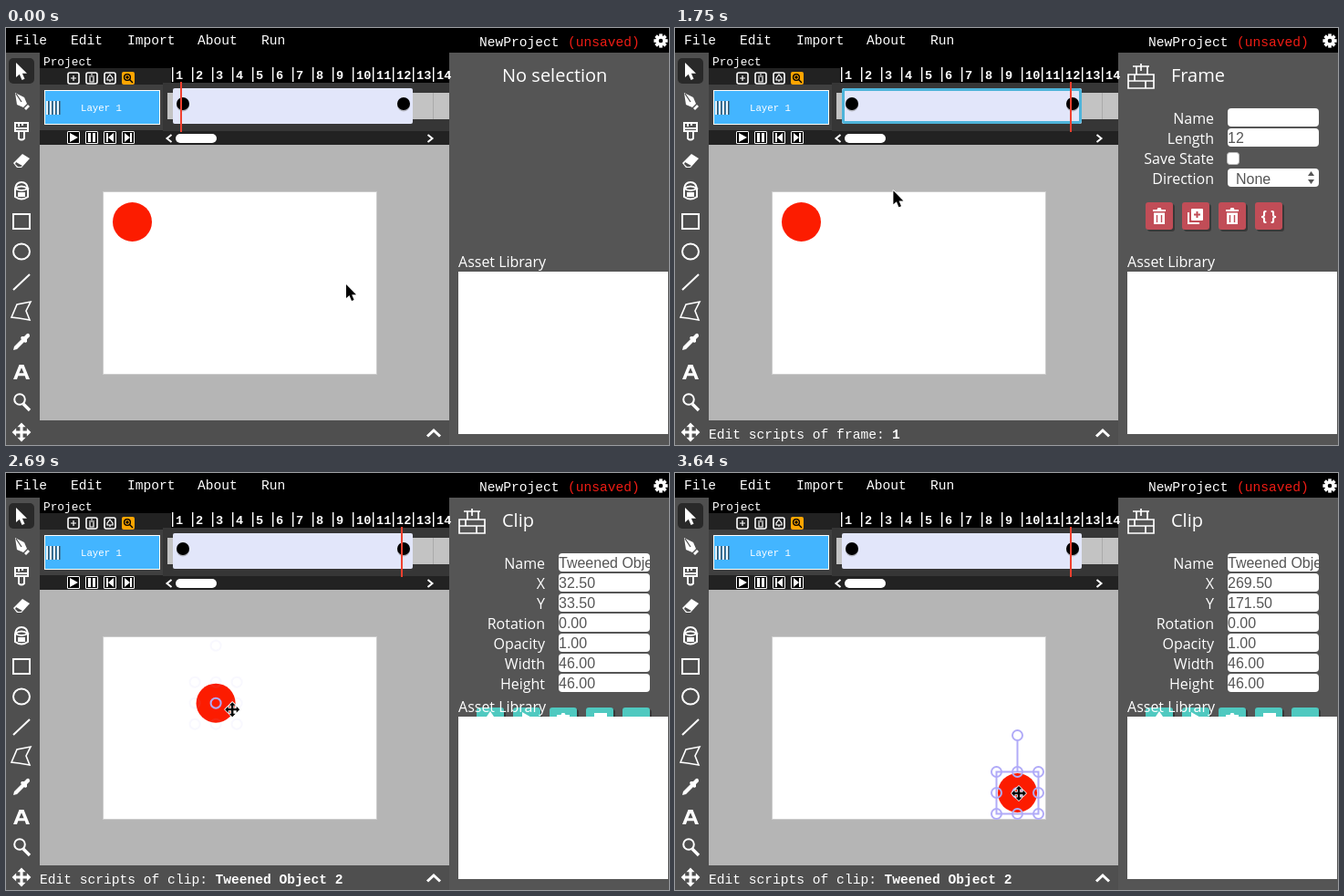
An HTML page that plays this animation: 727 px wide and 457 px high, repeating every 3.88 s.

```html
<!DOCTYPE html>
<html lang="en">
<head>
<meta charset="utf-8">
<title>Tween editor</title>
<style>
html, body { margin: 0; width: 100%; height: 100%; overflow: hidden; background: #555; }
svg { display: block; width: 727px; height: 457px; }
text { white-space: pre; }
.mono { font: 14.6px "Liberation Mono", monospace; fill: #fff; }
.sans { font: 16px "Open Sans", sans-serif; fill: #fff; }
.title { font-size: 20px; }
.value { font: 16px "Liberation Sans", sans-serif; fill: #555; }
.line { fill: none; stroke: #fff; stroke-width: 2; }
</style>
</head>
<body>
<svg id="stage" viewBox="0 0 727 457"></svg>
<script>
const LOOP = 3880;
const svg = document.getElementById('stage');

const rect = (x, y, w, h, fill, extra = '') =>
  `<rect x="${x}" y="${y}" width="${w}" height="${h}" fill="${fill}" ${extra}/>`;
const text = (x, y, s, cls, extra = '') => `<text x="${x}" y="${y}" class="${cls}" ${extra}>${s}</text>`;
const path = (d, extra = 'fill="#fff"') => `<path d="${d}" ${extra}/>`;
const line = (d, extra = '') => path(d, `class="line" ${extra}`);
const at = (x, y, body, extra = '') => `<g transform="translate(${x} ${y})" ${extra}>${body}</g>`;
const group = (id, body) => `<g id="${id}">${body}</g>`;
const repeat = (n, fn) => Array.from({ length: n }, (_, i) => fn(i)).join('');

const ARROW = 'M0 0V15L3.5 12L6 18L8.6 17L6.2 11.2H11Z';
const MOVE = 'M0-8L3.5-4.5H1.2V-1.2H4.5V-3.5L8 0L4.5 3.5V1.2H1.2V4.5H3.5L0 8L-3.5 4.5H-1.2V1.2H-4.5V3.5L-8 0L-4.5-3.5V-1.2H-1.2V-4.5H-3.5Z';
const TRASH = 'M-7-7H-2.5L-1.5-9H1.5L2.5-7H7V-5H-7ZM-6-3.5H6V9H-6Z';

function toolbar() {
  const icons = [
    path('M-6-9V7L-2.2 3.8L.5 10L3.5 8.7L.9 2.8H6Z'),
    path('M-7-9L3-4L6 3L2 7L-5 4ZM3 8L7 4L9 6L5 10Z') + path('M-6-8L0 1', 'stroke="#4f4f4f" stroke-width="1.3"'),
    line('M-7-9H7V0H-7ZM-3-9V-5M1-9V-6M-7-3H7M-3 0V8Q0 11 3 8V0'),
    path('M-9 2L1-8L9-3L0 7H-5Z') + path('M-6 1L1 5L-1 6H-4L-7 3Z', 'fill="#4f4f4f"'),
    line('M-7-3V6Q0 11 7 6V-3M-7-3Q0-8 7-3Q0 1-7-3M-7-3Q-6-10 0-10Q6-10 7-3') + rect(-4, 1, 8, 5, '#fff'),
    rect(-9, -8, 18, 16, 'none', 'class="line"'),
    '<ellipse rx="9" ry="8.5" class="line"/>',
    line('M-9 9L9-8'),
    line('M-11 6L-5-8L10-11L5-1L9 9L-3 7Z', 'style="stroke-width:1.6"'),
    path('M-9 9L-8 5L1-4L4-1L-5 8ZM0-6L3-6L6-9Q9-10 9-6L6-3V0L4 1L-1-4Z'),
    path('M-9 8L-2.5-8H2.5L9 8H5L3.7 4.3H-3.7L-5 8ZM-2.6 1.2H2.6L0-4.7Z'),
    '<circle cx="-2" cy="-3" r="5.8" class="line"/>' + line('M2 2L9 9', 'style="stroke-width:3.4"'),
    `<g transform="scale(1.3)">${path(MOVE)}</g>`
  ];
  return rect(0, 27, 37, 430, '#4f4f4f') + rect(3, 33, 28, 28, '#292929', 'rx="5"') +
    icons.map((icon, i) => at(17, 47 + 33 * i, icon)).join('');
}

function menus() {
  const items = [[10, 'File'], [71, 'Edit'], [133, 'Import'], [210, 'About'], [280, 'Run']];
  const teeth = repeat(8, i => rect(-1.8, -7.6, 3.6, 4, '#fff', `transform="rotate(${i * 45})"`));
  return rect(0, 0, 727, 27, '#000') +
    items.map(([x, s]) => text(x, 18, s, 'mono')).join('') +
    text(519, 20, 'NewProject', 'mono') +
    text(616, 20, '(unsaved)', 'mono', 'style="fill:#ef1c14"') +
    at(718, 14, teeth + '<circle r="4" fill="none" stroke="#fff" stroke-width="3.4"/>');
}

function timeline() {
  const layerIcons = ['M-3 0H3M0-3V3', 'M-3-2H3M-2-1V4H2V-1M-1-4H1', 'M0-4L3 0V2H-3V0ZM0 2V4', ''];
  const playIcons = [
    path('M-4-5L5 0L-4 5Z'),
    path('M-4-5H-1V5H-4ZM1-5H4V5H1Z'),
    path('M-4-5H-2V5H-4ZM4-5V5L-2 0Z'),
    path('M4-5H2V5H4ZM-4-5V5L2 0Z')
  ];
  const small = 'style="stroke-width:1.2;stroke:#fff"';
  return rect(37, 27, 449, 101, '#222') + rect(37, 27, 449, 17, '#000') + rect(181, 42, 305, 18, '#000') +
    rect(37, 62, 449, 50, '#404040') + rect(172, 60, 314, 53, '#363636') +
    text(41, 41, 'Project', 'mono', 'style="font-size:12.8px"') +
    layerIcons.map((d, i) => at(74 + 20 * i, 55, i < 3
      ? rect(-6, -6, 12, 12, '#222', 'rx="2" stroke="#fff" stroke-width="1.6"') + line(d, small)
      : rect(-7, -7, 14, 14, '#ffa500', 'rx="2"') +
        '<circle cx="-1" cy="-1" r="3.4" fill="none" stroke="#000" stroke-width="1.3"/>' +
        path('M1.5 1.5L5 5M-2.7-1H.7M-1-2.7V.7', 'stroke="#000" stroke-width="1.4"'))).join('') +
    rect(42.5, 68.5, 126, 37, '#43b5ff', 'stroke="#fff"') +
    repeat(4, i => rect(44 + 4 * i, 80, 2, 15, '#e8f6ff') + rect(46 + 4 * i, 80, 1.5, 15, '#34556c')) +
    text(82, 91, 'Layer 1', 'mono', 'style="font-size:10.7px"') +
    playIcons.map((icon, i) => at(74 + 20 * i, 120,
      rect(-7, -7, 14, 14, '#fff', 'rx="1.5"') + rect(-6, -6, 12, 12, '#000') + icon)).join('') +
    repeat(14, i => rect(182 + 22 * i, 43, 1.4, 16, '#fff') +
      text(186 + 22 * i, 56, i + 1, 'mono', 'style="font-size:13.6px;font-weight:bold"')) +
    rect(177, 71, 309, 29, '#c3c3c3') + rect(468, 71, 1, 29, '#aaa') +
    rect(183, 66, 263, 39, '#e2e6fa', 'rx="2"') +
    group('frameOutline', rect(184.5, 67.5, 260, 36, 'none', 'rx="2" stroke="#4eb4da" stroke-width="3"')) +
    [194, 436].map(x => `<circle cx="${x}" cy="84.5" r="7" fill="#8888"/><circle cx="${x}" cy="83" r="7"/>`).join('') +
    group('ghost', rect(-1, 59, 2, 55, '#e83c32', 'opacity=".55"')) +
    group('playhead', rect(-1, 59, 2, 55, '#f0402f')) +
    line('M181.5 117L176.5 121L181.5 125M462.500 117L467.500 121L462.500 125') +
    rect(186, 116, 45, 10, '#fff', 'rx="5"');
}

function panelHead(title) {
  return at(496, 38, line('M1 13H29V28H1ZM1 20H29M8 13V20M20 20V28M10 13V4H22V13M6 4H24M15 1V9', 'style="stroke-width:1.7"')) +
    text(544, 59, title, 'sans title');
}
const label = (i, s) => text(591, 104.5 + 22 * i, s, 'sans', 'text-anchor="end"');
const field = (i, s, id = '') => rect(606, 88 + 22 * i, 100, 20, '#fff', 'rx="4"') +
  text(606, 104 + 22 * i, s, 'value', `clip-path="url(#fields)" ${id && `id="${id}"`}`);
const button = (i, y, fill, icon) => rect(518 + 40 * i, y + 2, 30, 30, '#0005', 'rx="3"') +
  rect(516 + 40 * i, y, 30, 30, fill, 'rx="3"') + at(531 + 40 * i, y + 15, icon);

function framePanel() {
  const trash = path(TRASH) + path('M-2.500-1V7M2.500-1V7', 'stroke="#c14d57" stroke-width="1.4"');
  const copy = line('M-8-4V8H4') + rect(-5, -8, 13, 13, '#fff', 'rx="1"') +
    path('M1.500-5V2M-2-1.500H5', 'stroke="#c14d57" stroke-width="2"');
  const braces = text(0, 5.5, '{ }', 'sans', 'text-anchor="middle" style="font-weight:bold"');
  return panelHead('Frame') +
    ['Name', 'Length', 'Save State', 'Direction'].map((s, i) => label(i, s)).join('') +
    field(0, '') + field(1, '12') + rect(605.5, 136.5, 13, 13, '#fff', 'rx="3" stroke="#bbb"') +
    field(3, '') + text(615, 171, 'None', 'value') +
    path('M694 162L697.500 157L701 162ZM694 166L697.500 171L701 166Z', 'fill="#555"') +
    [trash, copy, trash, braces].map((icon, i) => button(i, 191, '#c14d57', icon)).join('');
}

function clipPanel() {
  const rows = ['Name', 'X', 'Y', 'Rotation', 'Opacity', 'Width', 'Height'];
  const values = ['Tweened Object 2', '', '', '0.00', '1.00', '46.00', '46.00'];
  const ids = ['', 'valueX', 'valueY'];
  const icons = [path('M0-11L6-2H-6Z'), path('M-5-10L7-3L-5 4Z'), path(TRASH),
    rect(-6, -9, 14, 14, '#fff'), path('M-8-5H-4V-2H-8ZM4-5H8V-2H4Z')];
  return panelHead('Clip') + rows.map((s, i) => label(i, s) + field(i, values[i], ids[i])).join('') +
    icons.map((icon, i) => button(i, 257, '#4fc9c0', icon)).join('');
}

function handles() {
  const ring = (x, y) => `<circle cx="${x}" cy="${y}" r="5.5"/>`;
  const spots = [-23, 0, 23].flatMap(x => [-23, 0, 23].map(y => [x, y])).filter(([x, y]) => x || y);
  return `<g fill="none" stroke="#b1abf8" stroke-width="2">` +
    group('box', path('M-23-23H23V23H-23ZM0-23V-57', '')) +
    group('rings', spots.map(p => ring(...p)).join('') + ring(0, -63)) + ring(0, 0) + '</g>';
}

function cursors() {
  const outline = 'fill="#000" stroke="#fff" stroke-width="1.6" paint-order="stroke" stroke-linejoin="round"';
  const hand = 'M-1.500 9V1Q0-1 1.500 1V6Q3 4.500 4.500 6.300Q6 5.300 7 7Q9 6.300 9.300 8.500V12Q9 14 8 16.500H0L-4.500 10.500Q-4.500 8.500-2.800 9Z';
  return group('cursor',
    group('arrow', path(ARROW, outline)) +
    group('hand', path(hand, 'fill="#fff" stroke="#000" stroke-width="1.2"') +
      path('M2 9.500V13.500M4.500 9.500V13.500M7 9.500V13.500', 'stroke="#000"')) +
    group('move', path(MOVE, outline)));
}

svg.innerHTML =
  '<defs><clipPath id="fields"><rect x="606" y="80" width="100" height="170"/></clipPath></defs>' +
  rect(37, 128, 449, 302, '#b5b5b5') + rect(37, 430, 449, 27, '#4f4f4f') + rect(486, 27, 241, 430, '#555') +
  menus() + toolbar() + timeline() +
  rect(106.5, 179.5, 300, 200, '#fff', 'stroke="#ccc"') +
  group('ball', '<circle r="21.5" fill="#fc1c00"/>' + group('selection', handles())) +
  group('status', text(37, 450, '', 'mono', 'id="statusText"') + text(0, 450, '', 'mono', 'id="statusName" font-weight="bold" style="font-weight:bold"')) +
  line('M462 447.500L469 441L476 447.500', 'style="stroke-width:3"') +
  group('emptyPanel', text(544, 59, 'No selection', 'sans title')) +
  group('framePanel', framePanel()) + group('clipPanel', clipPanel()) +
  text(496, 262, 'Asset Library', 'sans') + rect(496, 267, 230, 178, '#fff') +
  cursors();

const $ = id => document.getElementById(id);
const show = (id, on) => $(id).setAttribute('visibility', on ? 'inherit' : 'hidden');
const place = (id, x, y) => $(id).setAttribute('transform', `translate(${x} ${y})`);
const write = (id, s) => { if ($(id).textContent !== s) $(id).textContent = s; };

const BURSTS = [[300, 810, 10], [1520, 2040, 10], [2580, 3400, 15]];
const POINTER = [
  [243, 373, 281], [400, 390, 226], [570, 428, 114], [690, 437, 89], [810, 440, 81], [979, 440, 81],
  [980, 437, 85], [1462, 437, 85], [1580, 384, 108], [1750, 240, 178], [1870, 176, 199], [2040, 140, 213]
];
const DRAG = [
  [2520, 138.5, 212.5], [2580, 152, 218], [2700, 232, 253], [2810, 305, 281], [2870, 328.5, 291.5],
  [2930, 344.5, 302.5], [3050, 361, 322], [3220, 372, 343], [3400, 375.5, 350.5]
];

function snap(t) {
  for (const [first, last, count] of BURSTS) {
    if (t < first || t > last + 60) continue;
    const step = (last - first) / (count - 1);
    return first + step * Math.min(count - 1, Math.floor((t - first) / step + 0.25));
  }
  return t;
}

function follow(keys, t) {
  const i = keys.findIndex(k => k[0] > t);
  if (i === 0) return keys[0].slice(1);
  if (i < 0) return keys[keys.length - 1].slice(1);
  const [a, b] = [keys[i - 1], keys[i]];
  const p = (t - a[0]) / (b[0] - a[0]);
  return [a[1] + (b[1] - a[1]) * p, a[2] + (b[2] - a[2]) * p];
}

function draw(now) {
  const t = snap(now);
  const frameSelected = now >= 1340 && now < 2460;
  const clipSelected = now >= 2460;
  const dragging = now >= 2580 && now < 3640;
  const dropped = now >= 3640;

  const [bx, by] = follow(DRAG, t);
  place('ball', bx, by);
  show('selection', clipSelected);
  show('box', clipSelected && !dragging);
  $('rings').setAttribute('opacity', dragging ? 0.08 : 1);

  // The pointer runs slightly ahead of the clip it drags.
  const lead = follow(DRAG, t + 25);
  const [px, py] = now < 2460 ? follow(POINTER, t)
    : dragging ? [lead[0] + 1.5, lead[1] + 0.5] : [bx + 1.5, by + 0.5];
  const overFrame = py < 105;
  const moving = clipSelected || (now >= 1280 && now < 1340) || Math.hypot(px - bx, py - by) < 21.5;
  place('cursor', px, py);
  show('move', moving);
  show('hand', !moving && overFrame);
  show('arrow', !moving && !overFrame);

  const column = Math.floor((px - 182) / 22);
  place('ghost', 193 + 22 * column, 0);
  show('ghost', py < 114);
  place('playhead', now < 1340 ? 192 : 434, 0);
  show('frameOutline', frameSelected);

  show('emptyPanel', now < 1340);
  show('framePanel', frameSelected);
  show('clipPanel', clipSelected);
  write('valueX', dropped ? '269.50' : '32.50');
  write('valueY', dropped ? '171.50' : '33.50');

  show('status', now >= 1340);
  write('statusText', clipSelected ? 'Edit scripts of clip:' : 'Edit scripts of frame:');
  write('statusName', clipSelected ? 'Tweened Object 2' : '1');
  $('statusName').setAttribute('x', clipSelected ? 229.500 : 238);
}

const start = performance.now();
function tick() {
  draw((performance.now() - start) % LOOP);
  requestAnimationFrame(tick);
}
tick();
</script>
</body>
</html>
```
